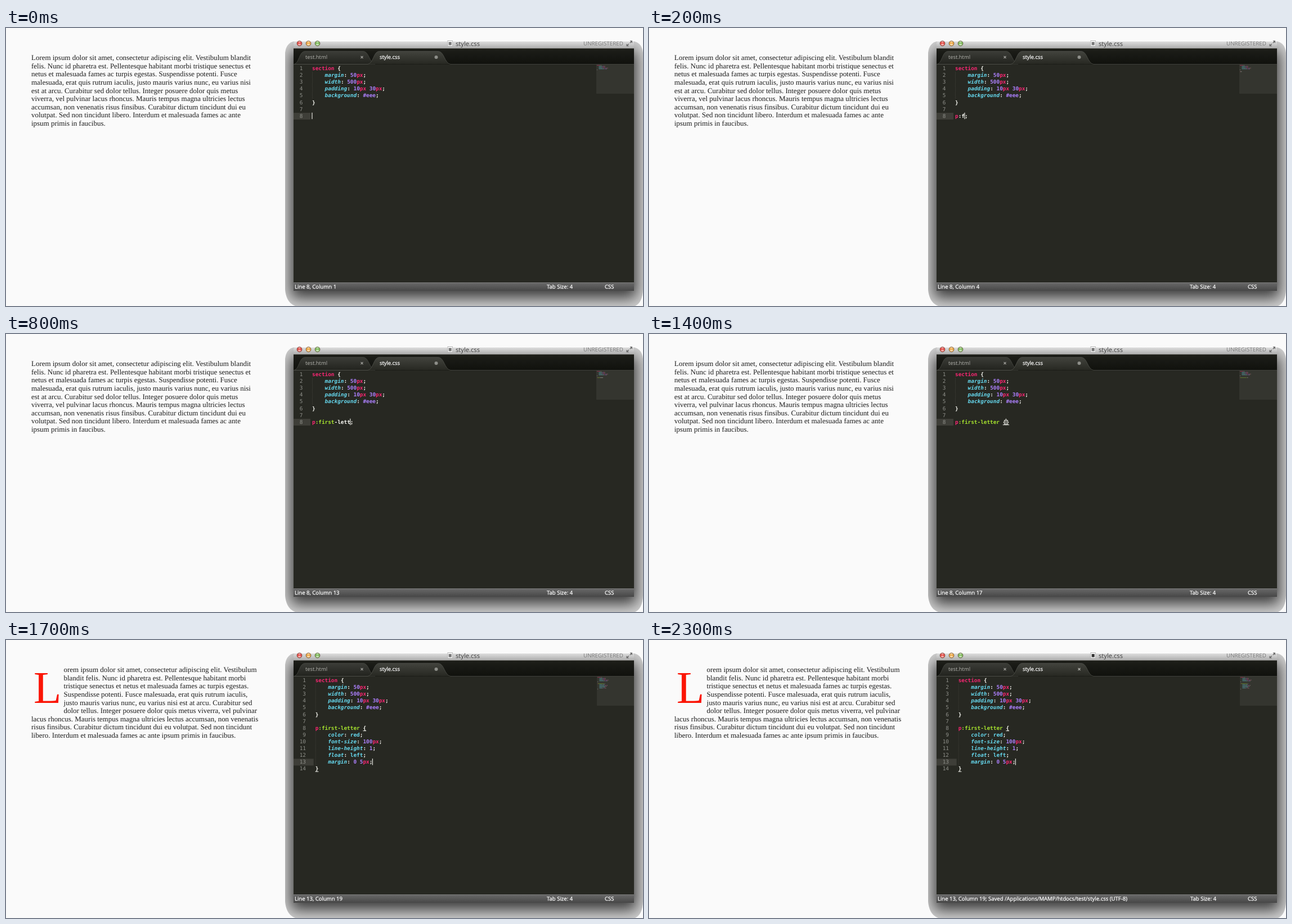
An HTML page that plays this animation: 1132x495 px, repeating every 2.4 s.

```html
<!DOCTYPE html>
<html lang="en">
<head>
<meta charset="utf-8">
<title>First letter styling</title>
<style>
  html, body { margin: 0; width: 100%; height: 100%; overflow: hidden; background: #fafafa; }
  svg { display: block; width: 100vw; height: 100vh; }
  text { text-rendering: geometricPrecision; }
  .page { font: 12.96px "Liberation Serif", serif; fill: #1c1c1c; }
  .ui { font: 9.55px "Open Sans", sans-serif; }
  .strong { fill: #fff; stroke: #fff; stroke-width: .25; }
  .code { font: bold 9.39px "DejaVu Sans Mono", monospace; }
  .num { font: 9.39px "DejaVu Sans Mono", monospace; fill: #8f908a; text-anchor: end; }
  .hint { font: 9.39px "DejaVu Sans Mono", monospace; fill: #333; }
  .prop { font-style: italic; }
</style>
</head>
<body>
<svg viewBox="0 0 1132 495">
  <defs>
    <linearGradient id="bar" x2="0" y2="1"><stop stop-color="#dedede"/><stop offset="1" stop-color="#a9a9a9"/></linearGradient>
    <linearGradient id="tabs" x2="0" y2="1"><stop stop-color="#1d1e19"/><stop offset="1" stop-color="#10110d"/></linearGradient>
    <linearGradient id="idle" x2="0" y2="1"><stop stop-color="#3b3c37"/><stop offset="1" stop-color="#22231e"/></linearGradient>
    <linearGradient id="active" x2="0" y2="1"><stop stop-color="#42433d"/><stop offset="1" stop-color="#272822"/></linearGradient>
    <linearGradient id="status" x2="0" y2="1"><stop stop-color="#6a6a6a"/><stop offset="1" stop-color="#474747"/></linearGradient>
    <linearGradient id="pick" x2="0" y2="1"><stop stop-color="#a3c1ea"/><stop offset="1" stop-color="#8aaddf"/></linearGradient>
    <filter id="soft" x="-10%" y="-10%" width="120%" height="130%"><feGaussianBlur stdDeviation="13"/></filter>
    <filter id="drop" x="-10%" y="-10%" width="120%" height="130%"><feGaussianBlur stdDeviation="3"/></filter>
    <clipPath id="edge"><path d="M511 24Q498 27 496 44V466Q498 489 514 495H1118Q1131 489 1132 466V44Q1130 27 1117 24Z"/></clipPath>
  </defs>
  <rect width="1132" height="495" fill="#fafafa"/>
  <g id="page" class="page"></g>

  <g clip-path="url(#edge)">
    <rect x="495" y="23" width="637" height="472" fill="#d2d2d2"/>
    <rect x="506" y="40" width="615" height="441" fill="#000" opacity=".72" filter="url(#soft)"/>
  </g>
  <path d="M511 37V27Q511 24 514 24H1113Q1116 24 1116 27V37Z" fill="url(#bar)"/>
  <rect x="511" y="36" width="605" height="1" fill="#55554f"/>
  <g id="lights"></g>
  <text x="799" y="31.5" class="ui" style="font-size:11.2px" fill="#3c3c3c">style.css</text>
  <text x="1026" y="31" class="ui" style="font-size:9.8px" fill="#787878">UNREGISTERED</text>
  <g fill="#6b6b6b" stroke="#6b6b6b">
    <path d="M1108.500 22.500H1113V27Z M1102.500 28V32.500H1107Z" stroke="none"/>
    <path d="M1108.800 26.700L1111.500 24M1106.700 28.300L1104 31" stroke-width="1.4"/>
  </g>

  <rect x="511" y="37" width="605" height="28" fill="url(#tabs)"/>
  <path d="M512 64.500C521 63 521 41.500 531 41.500H635C645 41.500 646 63 656 64.500Z" fill="url(#idle)" stroke="#4b4c47" stroke-width=".7"/>
  <path d="M511 64.500H643C653 63 653 41.500 663 41.500H768C779 41.500 779 63 790 64.500H1116" fill="url(#active)" stroke="#54554f" stroke-width=".7"/>
  <text x="532" y="55" class="ui" style="font-size:9.4px" fill="#b4b4af">test.html</text>
  <text x="664" y="55" class="ui strong" style="font-size:9.37px">style.css</text>
  <path d="M630.500 50l4 4m0-4l-4 4" stroke="#a0a09b" stroke-width="1.2"/>

  <rect x="511" y="65" width="605" height="388" fill="#272822"/>
  <rect x="511" y="453" width="605" height="15" fill="url(#status)"/>
  <rect x="511" y="453" width="605" height="1" fill="#7c7c7c"/>
  <text x="1064" y="463.700" class="ui strong">CSS</text>
  <g id="live"></g>
</svg>
<script>
const LOOP = 2400, STEP = 100;
const EXPAND = 15, COLOR = 16, DONE = 17, SAVED = 20;
const CHAR = 5.653, ROW = 12.1, TOP = 75;
const PINK = '#f92672', BLUE = '#66d9ef', VIOLET = '#ae81ff', GREEN = '#a6e22e', WHITE = '#f8f8f2';

const SELECTOR = 'p:first-letter {';
const TYPED = [0, 1, 3, 4, 6, 7, 9, 10, 12, 13, 14, 14, 14, 15, 16];
const BASE = ['section {', '    margin: 50px;', '    width: 500px;', '    padding: 10px 30px;', '    background: #eee;', '}', ''];
const RULES = ['color: red;', 'font-size: 100px;', 'line-height: 1;', 'float: left;', 'margin: 0 5px;'].map(r => '    ' + r);
const HINTS = ['padding', 'position', 'padding-left', 'padding-top', 'padding-right', 'padding-bottom', 'page-break-inside', 'page-break-before'];

const PLAIN = `Lorem ipsum dolor sit amet, consectetur adipiscing elit. Vestibulum blandit
felis. Nunc id pharetra est. Pellentesque habitant morbi tristique senectus et
netus et malesuada fames ac turpis egestas. Suspendisse potenti. Fusce
malesuada, erat quis rutrum iaculis, justo mauris varius nunc, eu varius nisi
est at arcu. Curabitur sed dolor tellus. Integer posuere dolor quis metus
viverra, vel pulvinar lacus rhoncus. Mauris tempus magna ultricies lectus
accumsan, non venenatis risus finsibus. Curabitur dictum tincidunt dui eu
volutpat. Sed non tincidunt libero. Interdum et malesuada fames ac ante
ipsum primis in faucibus.`.split('\n');
const FLOATED = `orem ipsum dolor sit amet, consectetur adipiscing elit. Vestibulum
blandit felis. Nunc id pharetra est. Pellentesque habitant morbi
tristique senectus et netus et malesuada fames ac turpis egestas.
Suspendisse potenti. Fusce malesuada, erat quis rutrum iaculis,
justo mauris varius nunc, eu varius nisi est at arcu. Curabitur sed
dolor tellus. Integer posuere dolor quis metus viverra, vel pulvinar
lacus rhoncus. Mauris tempus magna ultricies lectus accumsan, non venenatis
risus finsibus. Curabitur dictum tincidunt dui eu volutpat. Sed non tincidunt
libero. Interdum et malesuada fames ac ante ipsum primis in faucibus.`.split('\n');

const $ = id => document.getElementById(id);
const text = (x, y, s, attrs = '') => `<text x="${x}" y="${y}" ${attrs}>${s}</text>`;
const rect = (x, y, w, h, fill, attrs = '') => `<rect x="${x}" y="${y}" width="${w}" height="${h}" fill="${fill}" ${attrs}/>`;

$('lights').innerHTML = ['#e2463f', '#e9a23b', '#78b653'].map((c, i) => {
  const x = 521.5 + 16 * i;
  return `<circle cx="${x}" cy="27.500" r="4.500" fill="${c}" stroke="#6d5a50" stroke-width=".8"/>
    <ellipse cx="${x}" cy="29.300" rx="2.600" ry="1.700" fill="#fff" opacity=".55"/>
    <ellipse cx="${x}" cy="25" rx="2.200" ry="1.100" fill="#fff" opacity=".6"/>`;
}).join('');

function tokens(line) {
  const rule = line.match(/^( +)([\w-]+)(:.*)$/);
  if (rule) {
    const value = rule[3].match(/#\w+|\d+|px|[a-z]+|[^#\da-z]+/g).map(s =>
      [s, s === 'px' ? PINK : /^[#\d]/.test(s) ? VIOLET : /^[a-z]/.test(s) ? BLUE : WHITE]);
    return [[rule[1], WHITE], [rule[2], BLUE, 'prop'], ...value];
  }
  const sel = line.match(/^(section|p)?(:first(?:-letter)?)?(.*)$/);
  return [[sel[1], PINK], [sel[2], GREEN], [sel[3], WHITE]].filter(t => t[0]);
}

function editorState(step) {
  if (step < EXPAND) {
    const n = TYPED[step];
    const tail = n === 16 ? '}' : step > 1 && step < 12 ? ';' : '';
    return { lines: [...BASE, SELECTOR.slice(0, n) + tail], row: 7, col: n };
  }
  const body = step >= DONE ? RULES : step === COLOR ? RULES.slice(0, 1) : ['    '];
  return {
    lines: [...BASE, SELECTOR, ...body, '}'],
    row: 7 + body.length,
    col: body[body.length - 1].length
  };
}

function drawCode({ lines, row, col }) {
  const shift = lines.length > 9 ? CHAR : 0, left = 544 + shift;
  const mapLeft = 1050 + (shift ? 1 : 0);
  let out = rect(511, TOP + row * ROW - 8.7, 30 + shift, 12, '#3e3e38');
  out += rect(mapLeft - 1, 65, 1117 - mapLeft, 52, '#34352f');
  lines.forEach((line, i) => {
    const y = TOP + i * ROW;
    out += text(527.3 + shift, y, i + 1, 'class="num"');
    if (line.startsWith('    ')) {
      out += `<path d="M${left + .5} ${y - 9}v${ROW}" stroke="#4a4a42" stroke-width=".8" stroke-dasharray="1 1"/>`;
    }
    let c = 0;
    for (const [s, fill, style = ''] of tokens(line)) {
      const pad = s.length - s.trimStart().length, word = s.trim();
      if (word) {
        out += text(left + (c + pad) * CHAR, y, s.slice(pad), `class="code ${style}" fill="${fill}"`);
        out += rect(mapLeft + (c + pad) * .85, 66 + i * 1.6, word.length * .85, 1, fill, 'opacity=".4"');
      }
      c += s.length;
    }
  });
  const underline = (r, c) => rect(left + c * CHAR, TOP + r * ROW + 1.5, CHAR, 1, WHITE);
  if (lines[7].includes('{')) {
    out += underline(7, 15);
    out += row > 7 ? underline(lines.length - 1, 0) : underline(7, 16);
  }
  return out + rect(left + col * CHAR - .6, TOP + row * ROW - 9, 1.1, 11.5, WHITE);
}

function drawHints() {
  const items = HINTS.map((s, i) =>
    text(557, 174.7 + i * 14.55, `<tspan font-weight="bold" fill="#000">${s[0]}</tspan>${s.slice(1)}`, 'class="hint"'));
  return rect(554, 167, 243, 117, '#000', 'opacity=".45" filter="url(#drop)"') +
    rect(553.5, 163.5, 243.5, 117.5, '#fcfcfc', 'stroke="#8b8b8b" stroke-width=".8"') +
    rect(554, 164, 242.5, 15, 'url(#pick)') + items.join('');
}

function drawPage(floated) {
  const lines = (floated ? FLOATED : PLAIN).map((s, i) =>
    text(floated && i < 6 ? 102.55 : 45, 57.2 + i * 14.58, s));
  const cap = floated ? text(49, 112, 'L', 'fill="#fb1505" style="font-size:81px"') : '';
  return lines.join('') + cap;
}

function drawChrome(step, { row, col }) {
  const saved = step >= SAVED;
  const note = saved ? '; Saved /Applications/MAMP/htdocs/test/style.css (UTF-8)' : '';
  const mark = saved
    ? '<path d="M762.500 50l4 4m0-4l-4 4" stroke="#b4b4af" stroke-width="1.2"/>'
    : '<circle cx="764.500" cy="52" r="3" fill="#8d8e89"/>';
  return mark +
    rect(785, 22.5, 8.5, 10, '#f4f4f4', 'stroke="#a5a5a5" stroke-width=".7"') +
    rect(786.7, 25, 5, 5.5, saved ? '#333' : '#777') +
    text(513, 463.7, `Line ${row + 1}, Column ${col + 1}${note}`, 'class="ui strong"') +
    text(saved ? 962 : 961, 463.7, 'Tab Size: 4', 'class="ui strong"');
}

let shown = -1;
function render(time) {
  const step = Math.floor((time % LOOP) / STEP);
  if (step === shown) return;
  shown = step;
  const state = editorState(step);
  $('page').innerHTML = drawPage(step >= DONE);
  $('live').innerHTML = drawCode(state) + drawChrome(step, state) + (step === 1 ? drawHints() : '');
}

function tick() {
  render(performance.now());
  requestAnimationFrame(tick);
}
tick();
</script>
</body>
</html>
```
